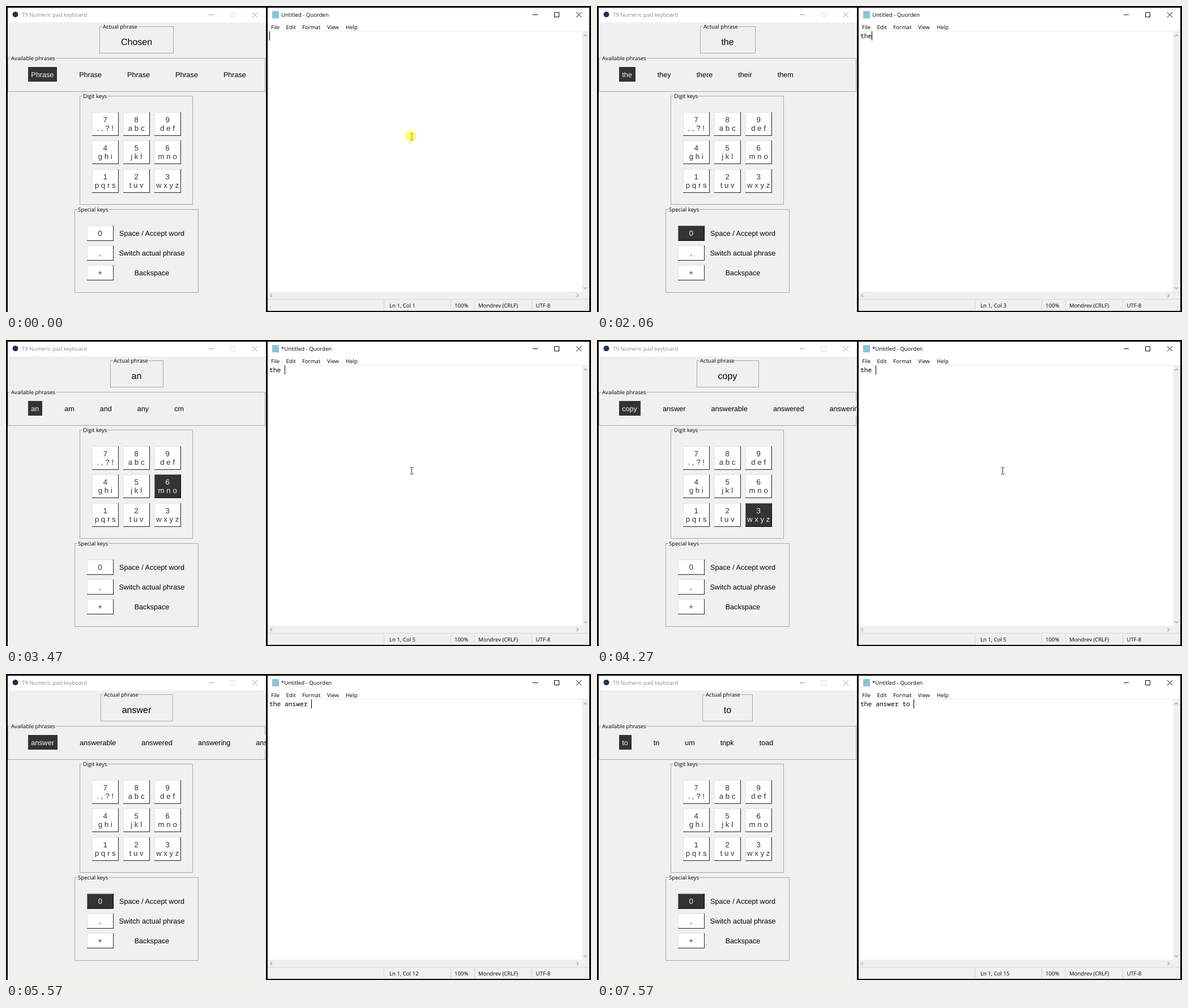
An HTML page that plays this animation: 1033 px wide and 542 px high, repeating every 8 s.

```html
<!DOCTYPE html>
<html lang="en">
<head>
<meta charset="utf-8">
<title>Numeric pad keyboard</title>
<style>
  html, body { margin: 0; width: 100%; height: 100%; overflow: hidden; background: #000; }
  svg { display: block; }
  text { white-space: pre; text-rendering: geometricPrecision; }
  rect { shape-rendering: crispEdges; }
  .ui { font: 9.6px "Open Sans", "Noto Sans", sans-serif; }
  .app { font: 12.6px "Liberation Sans", Arial, sans-serif; }
  .key { font: 13.3px "Liberation Sans", Arial, sans-serif; }
  .big { font: 16px "Liberation Sans", Arial, sans-serif; }
  .mono { font: 11.25px "Noto Sans Mono", "DejaVu Sans Mono", monospace; }
</style>
</head>
<body>
<svg id="stage" width="1033" height="542" viewBox="0 0 1033 542">
  <defs><clipPath id="pane"><rect x="3" y="3" width="456" height="539"/></clipPath></defs>
</svg>
<script>
const NS = "http://www.w3.org/2000/svg";
const LOOP = 8000;
const stage = document.getElementById("stage");

function el(tag, attrs, parent = stage) {
  const node = document.createElementNS(NS, tag);
  for (const k in attrs) node.setAttribute(k, attrs[k]);
  parent.appendChild(node);
  return node;
}
const rect = (x, y, width, height, fill, parent) =>
  el("rect", { x, y, width, height, fill }, parent);
const line = (d, stroke, width = 1, parent) =>
  el("path", { d, stroke, "stroke-width": width, fill: "none" }, parent);
function text(str, x, y, cls, fill = "#000", anchor = "start", parent) {
  const node = el("text", { x, y, class: cls, fill, "text-anchor": anchor }, parent);
  node.textContent = str;
  return node;
}
const show = (node, on) => node.setAttribute("visibility", on ? "visible" : "hidden");

function setBox(node, x, width) {
  node.setAttribute("x", x);
  node.setAttribute("width", width);
}

function windowButtons(x, min, max, close) {
  line(`M${x} 15.5h9`, min);
  line(`M${x + 38.5} 11.5h8v8h-8z`, max);
  line(`M${x + 77} 11l9 9m0 -9l-9 9`, close);
}

// Outlined group whose caption interrupts the top edge
function group(label, x, y, w, h) {
  const frame = el("rect", { x: x + .5, y: y + .5, width: w, height: h, fill: "none", stroke: "#a6a6a6" });
  const gap = rect(x + 5, y - 4, 10, 9, "#f0f0f0");
  const caption = text(label, x + 6, y + 3.7, "ui");
  const capWidth = caption.getComputedTextLength();
  gap.setAttribute("width", capWidth + 2);
  return {
    resize(left, width) {
      setBox(frame, left + .5, width);
      gap.setAttribute("x", left + 5);
      caption.setAttribute("x", left + 6);
    }
  };
}

function makeKey(x, y, h, lines) {
  const edge = rect(x, y, 47, h, "#222");
  const rim = rect(x, y, 45.5, h - 1.5, "#e3e3e3");
  const face = rect(x + 1, y + 1, 44.5, h - 2.5, "#fff");
  const labels = lines.map((s, i) => text(s, x + 23.2, y + 18.2 + i * 15.2, "key", "#333", "middle"));
  return on => {
    edge.setAttribute("fill", on ? "#000" : "#222");
    rim.setAttribute("fill", on ? "#777" : "#e3e3e3");
    face.setAttribute("fill", on ? "#333" : "#fff");
    labels.forEach(l => l.setAttribute("fill", on ? "#f4f4f4" : "#333"));
  };
}

// Keyboard window
rect(3, 3, 456, 539, "#f0f0f0");
rect(3, 3, 456, 26, "#fff");
el("circle", { cx: 16.5, cy: 15, r: 5, fill: "#1f3450" });
text("T9 Numeric pad keyboard", 28, 19.3, "ui", "#8e8e8e");
windowButtons(358, "#999", "#dedede", "#999");

const actual = group("Actual phrase", 165, 36, 130, 47);
const chosen = text("", 230.5, 69, "big", "#000", "middle");
group("Available phrases", 3, 92, 454, 59);
group("Digit keys", 130, 159, 199, 192);
group("Special keys", 121, 360, 218, 147);

const keys = {};
const pad = [["7", ". , ? !"], ["8", "a b c"], ["9", "d e f"],
             ["4", "g h i"], ["5", "j k l"], ["6", "m n o"],
             ["1", "p q r s"], ["2", "t u v"], ["3", "w x y z"]];
pad.forEach((p, i) => {
  const row = Math.floor(i / 3);
  keys[p[0]] = makeKey(152 + i % 3 * 55, 188 + Math.floor(row * 50.5), 42, p);
});
const special = [["0", "Space / Accept word"], [",", "Switch actual phrase"], ["+", "Backspace"]];
special.forEach(([k, label], i) => {
  const y = 389 + i * 35;
  keys[k] = makeKey(143, y, 27, [k]);
  text(label, 257.5, y + 17.6, "app", "#000", "middle");
});

const list = el("g", { "clip-path": "url(#pane)" });
const items = Array.from({ length: 5 }, (_, i) => ({
  back: rect(0, 108, 10, 26, i ? "#f0f0f0" : "#333", list),
  label: text("", 0, 125.6, "app", i ? "#000" : "#f4f4f4", "start", list)
}));

// Editor window
rect(462, 3, 568, 536.5, "#fff");
rect(470, 9, 12, 13, "#8bc3d8");
const title = text("", 486, 19.3, "ui");
windowButtons(930, "#000", "#000", "#000");
["File", "Edit", "Format", "View", "Help"].forEach((m, i) =>
  text(m, [468, 494.5, 523, 567, 600][i], 40.5, "ui"));
rect(462, 44, 568, 1, "#ececec");
rect(1017, 45, 13, 475, "#f0f0f0");
rect(462, 506, 568, 33.5, "#f0f0f0");
rect(462, 519, 568, 1, "#d9d9d9");
for (const x of [667, 785, 827, 928]) rect(x, 521, 1, 18, "#d4d4d4");
for (const d of ["M1020 54l3 -3l3 3", "M1020 498l3 3l3 -3", "M470 510l-3 3l3 3", "M1007.5 510l3 3l-3 3"])
  line(d, "#a8a8a8", 1.3);
for (let i = 0; i < 3; i++)
  for (let j = 0; j <= i; j++) rect(1027 - j * 3, 531 + i * 3, 1, 1, "#b8b8b8");

const col = text("", 677, 534.3, "ui");
text("100%", 792, 534.3, "ui");
text("Mondrev (CRLF)", 834, 534.3, "ui");
text("UTF-8", 935.5, 534.3, "ui");

const typed = text("", 465, 57, "mono");
const caret = rect(465, 45, 1, 16, "#000");
const pointer = line("M713.5 225.5h2l1 1l1 -1h2M716.5 226v11M713.5 237.5h2l1 -1l1 1h2", "#222");
const glow = el("circle", { cx: 714.5, cy: 230.5, r: 10.3, fill: "#ff0", opacity: .5 });

// Each step lists only what changes at that time
const tList = "t the they there their";
const steps = [
  [0, { key: "", words: "Phrase Phrase Phrase Phrase Phrase", phrase: "Chosen",
        typed: "", col: 1, star: "", caret: true, pointer: true, glow: true }],
  [70, { glow: false }],
  [530, { caret: false }],
  [880, { key: "2" }],
  [970, { words: tList, phrase: "t" }],
  [1060, { caret: true }],
  [1280, { key: "4", words: "the they there their them", phrase: "the" }],
  [1460, { key: "9" }],
  [1530, { caret: false }],
  [2060, { key: "0", typed: "the", col: 3, caret: true, pointer: false }],
  [2130, { typed: "the ", col: 5, star: "*" }],
  [2600, { caret: false }],
  [3060, { key: "8", words: "a and as at be", phrase: "a", pointer: true }],
  [3130, { caret: true }],
  [3470, { key: "6", words: "an am and any cm", phrase: "an" }],
  [3660, { caret: false }],
  [3870, { key: "1", words: "amp cos cor bor cop", phrase: "amp" }],
  [4190, { caret: true }],
  [4270, { key: "3", words: "copy answer answerable answered answering", phrase: "copy" }],
  [4590, { key: "9" }],
  [4650, { words: "answer answerable answered answering answers", phrase: "answer" }],
  [4720, { caret: false }],
  [4980, { key: "1" }],
  [5240, { caret: true }],
  [5510, { key: "0", typed: "the answer", col: 10, pointer: false }],
  [5570, { typed: "the answer ", col: 12 }],
  [6100, { caret: false }],
  [6170, { key: "2", words: tList, phrase: "t", pointer: true }],
  [6630, { key: "6", words: "to tn um tnpk toad", phrase: "to", caret: true }],
  [7160, { caret: false }],
  [7570, { key: "0", typed: "the answer to ", col: 15, caret: true, pointer: false }]
];
let merged = {};
const states = steps.map(([at, change]) => ({ at, ...(merged = { ...merged, ...change }) }));

function layoutWords(words) {
  let x = 44.3;
  words.split(" ").forEach((w, i) => {
    const { back, label } = items[i];
    label.textContent = w;
    label.setAttribute("x", x);
    const width = label.getComputedTextLength();
    setBox(back, Math.round(x - 5.3), Math.round(width + 11));
    x += width + 45;
  });
}

function draw(s) {
  for (const k in keys) keys[k](k === s.key);
  chosen.textContent = s.phrase;
  const width = Math.round(chosen.getComputedTextLength() + 75);
  actual.resize(Math.round(230.3 - width / 2), width);
  layoutWords(s.words);
  title.textContent = s.star + "Untitled - Quorden";
  typed.textContent = s.typed;
  col.textContent = "Ln 1, Col " + s.col;
  caret.setAttribute("x", Math.floor(465 + s.typed.length * 6.75));
  show(caret, s.caret);
  show(pointer, s.pointer);
  show(glow, s.glow);
}

let current;
const start = performance.now();
function tick() {
  const t = (performance.now() - start) % LOOP;
  const state = states.filter(s => s.at <= t).pop();
  if (state !== current) draw(current = state);
  requestAnimationFrame(tick);
}
tick();
</script>
</body>
</html>
```
